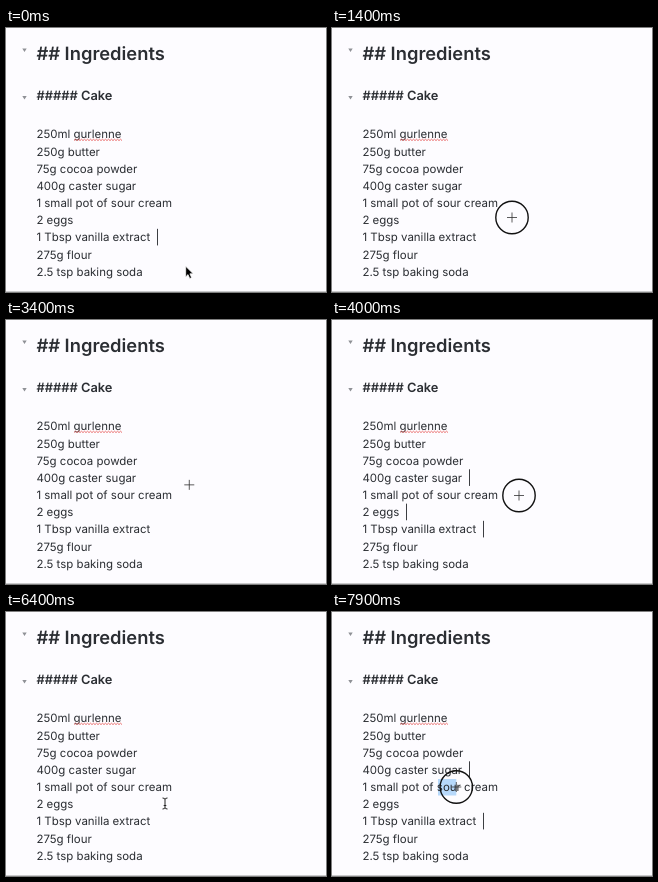
An HTML page for the animation above (8000 ms loop, 320 by 264 pixels).

```html
<!DOCTYPE html>
<html lang="en">
<head>
<meta charset="utf-8">
<title>Multiple carets</title>
<style>
  html, body { margin: 0; width: 100%; height: 100%; overflow: hidden; background: #fdfcff; }
  svg { display: block; width: 320px; height: 264px; }
  text { font: 400 11.47px Inter, "Open Sans", sans-serif; fill: #2b2e33; text-rendering: geometricPrecision; }
  text.h2 { font-size: 18.35px; font-weight: 600; }
  text.h5 { font-size: 12.85px; font-weight: 600; }
</style>
</head>
<body>
<svg viewBox="0 0 320 264">
  <rect id="selection" x="106" y="167" height="16.5" fill="#b7d9fb"/>
  <path d="M16.3 20.5h4.4l-2.2 3.6zM16.3 68h4.4l-2.2 3.6z" fill="#8f9196"/>
  <text class="h2" x="30.4" y="31.6">## Ingredients</text>
  <text class="h5" x="30.4" y="72.3">##### Cake</text>
  <g id="lines"></g>
  <path id="squiggle" fill="none" stroke="#e8615f" stroke-width=".9"/>
  <g id="carets" fill="#3c3e42"></g>
  <rect y="263" width="320" height="1" fill="#c9c9cb"/>
  <g id="pointer">
    <path id="arrow" d="M0 0V10.6L2.3 8.3L4 12.2L5.9 11.4L4.2 7.5H7.5Z" fill="#000" stroke="#fff" stroke-width=".7"/>
    <path id="beam" d="M-2.5-5.5Q0-5.5 0-4Q0-5.5 2.5-5.5M0-4V4M-2.5 5.5Q0 5.5 0 4Q0 5.5 2.5 5.5M-1.3 2H1.3" fill="none" stroke="#222"/>
    <path id="cross" d="M-5 0H5M0-5V5" stroke="#333" stroke-width=".8"/>
    <circle id="ring" r="16.2" fill="none" stroke="#111" stroke-width="1.4"/>
  </g>
</svg>
<script>
const LOOP = 8000, STEP = 100, GLIDE = 600, HOLD = 200, BLINK = 560;
const LEFT = 30.4, TWO_SPACES = 6.4, DRAG = 7100;
const $ = id => document.getElementById(id);
const baseline = i => 110.4 + 17.17 * i;

function add(parent, tag, attrs, text = "") {
  const el = document.createElementNS("http://www.w3.org/2000/svg", tag);
  for (const k in attrs) el.setAttribute(k, attrs[k]);
  el.textContent = text;
  return parent.appendChild(el);
}

const lines = ["250ml gurlenne", "250g butter", "75g cocoa powder", "400g caster sugar",
  "1 small pot of sour cream", "2 eggs", "1 Tbsp vanilla extract", "275g flour", "2.5 tsp baking soda"]
  .map((s, i) => add($("lines"), "text", { x: LEFT, y: baseline(i) }, s));

$("squiggle").setAttribute("d", "M68 112.6" + "l1.5-1.4l1.5 1.4".repeat(16));

// Places the pointer stops at; a stop with a line is a click that toggles its caret.
const stops = [
  { t: 0, x: 179.7, y: 238.3 },
  { t: 900, x: 183, y: 196 },
  { t: 1300, x: 180, y: 189.5, line: 5 },
  { t: 1800, x: 185.5, y: 176.5, line: 4 },
  { t: 2500, x: 183, y: 164, line: 3 },
  { t: 3900, x: 187, y: 175.5, line: 4 },
  { t: 4500, x: 180, y: 193, line: 5 },
  { t: 6100, x: 180, y: 193 },
  { t: 6400, x: 159, y: 191.5 },
  { t: DRAG, x: 106, y: 175 },
  { t: 7900, x: 124.3, y: 175 }
];
const clicks = stops.filter(s => s.line);

// A caret is added on release and removed on press; each change restarts the blink.
const carets = [{ line: 6, from: -300, to: LOOP }];
for (const { t, line } of clicks) {
  const old = carets.find(c => c.line === line);
  if (old) old.to = t;
  else carets.push({ line, from: t + HOLD, to: LOOP });
}
for (const c of carets) {
  const x = Math.round(LEFT + lines[c.line].getComputedTextLength() + TWO_SPACES);
  c.el = add($("carets"), "rect", { x, y: baseline(c.line) - 12.6, width: 1, height: 16.6 });
}
const changes = carets.flatMap(c => [c.from, c.to]);

const show = (el, on) => el.setAttribute("visibility", on ? "visible" : "hidden");
const mix = (a, b, k) => a + (b - a) * k;

function pointerAt(t) {
  const i = stops.findIndex(s => s.t > t);
  if (i < 0) return stops[stops.length - 1];
  const a = stops[i - 1], b = stops[i];
  const begin = Math.max(a.t + (a.line ? HOLD : 0), b.t - GLIDE);
  const k = Math.max(0, (t - begin) / (b.t - begin));
  const ease = k * k * (3 - 2 * k);
  return { x: mix(a.x, b.x, ease), y: mix(a.y, b.y, ease) };
}

function shapeAt(t) {
  if (t < 600) return "arrow";
  return t < 900 || (t >= 5700 && t < DRAG) ? "beam" : "cross";
}

function draw(now) {
  const t = Math.floor((now % LOOP) / STEP) * STEP;
  const { x, y } = pointerAt(t);
  $("pointer").setAttribute("transform", `translate(${x} ${y})`);
  for (const id of ["arrow", "beam", "cross"]) show($(id), id === shapeAt(t));
  show($("ring"), t >= DRAG || clicks.some(c => t >= c.t && t < c.t + HOLD));
  const restart = Math.max(...changes.filter(c => c <= t));
  const lit = (t - restart) % (2 * BLINK) < BLINK;
  for (const c of carets) show(c.el, lit && t >= c.from && t < c.to);
  $("selection").setAttribute("width", t >= DRAG ? x - 106 : 0);
}

const start = performance.now();
function tick() {
  draw(performance.now() - start);
  requestAnimationFrame(tick);
}
tick();
</script>
</body>
</html>
```
